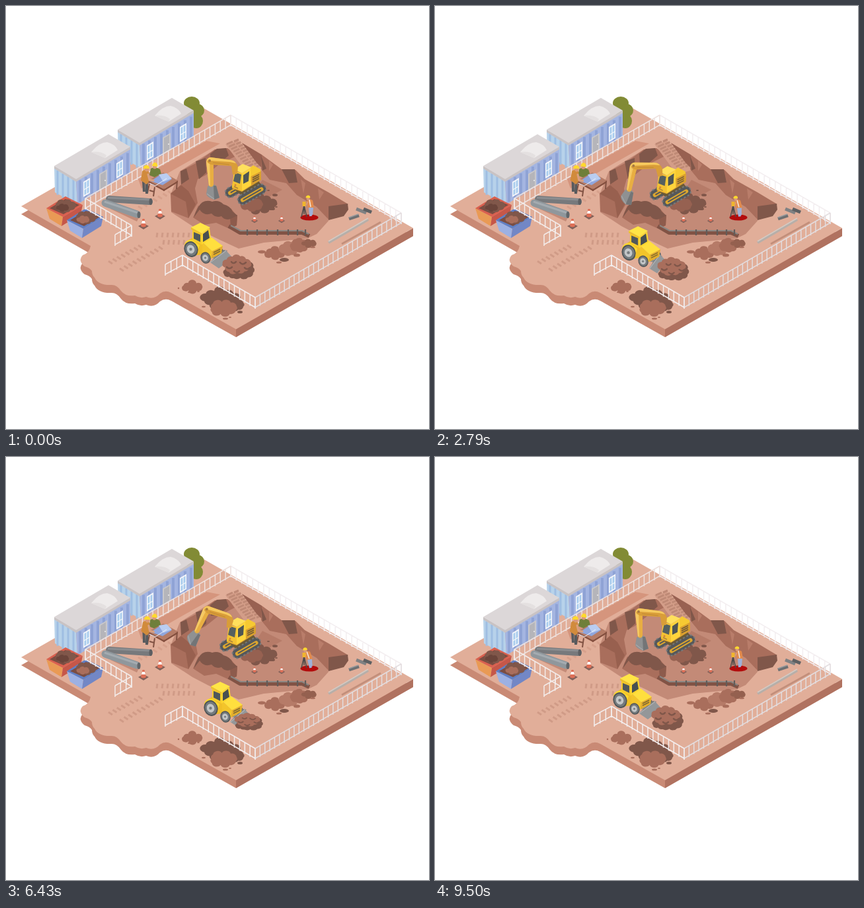
An HTML page that plays this animation: 640 px wide and 640 px high, repeating every 9.57 s.

```html
<!DOCTYPE html>
<html lang="en">
<head>
<meta charset="utf-8">
<title>Building site</title>
<style>
html, body { margin: 0; width: 100%; height: 100%; overflow: hidden; background: #fff; }
svg { display: block; width: 100vw; height: 100vh; }
</style>
</head>
<body>
<svg id="stage" viewBox="0 0 640 640"></svg>
<script>
const LOOP = 9570;
const SOIL = '#a96e5c', DARK = '#80574a', YEL = '#ffd92e', AMBER = '#e8ae42', GREY = '#8c8e90', COAL = '#55585b';

// Drawing helpers, each returns SVG markup
const poly = (fill, pts) => `<polygon fill="${fill}" points="${pts}"/>`;
const path = (fill, d) => `<path fill="${fill}" d="${d}"/>`;
const line = (c, w, d, cap = 'butt') => `<path d="${d}" fill="none" stroke="${c}" stroke-width="${w}" stroke-linecap="${cap}" stroke-linejoin="round"/>`;
const oval = (fill, x, y, rx, ry = rx, rot = 0) =>
  `<ellipse fill="${fill}" cx="${x}" cy="${y}" rx="${rx}" ry="${ry}" transform="rotate(${rot} ${x} ${y})"/>`;
const group = (id, body) => `<g id="${id}">${body}</g>`;
const shift = (x, y, body) => `<g transform="translate(${x} ${y})">${body}</g>`;

// Lumpy outline made of arcs round an ellipse
function blob(fill, x, y, rx, ry, n = 9) {
  let d = '';
  for (let i = 0; i <= n; i++) {
    const a = i * 2 * Math.PI / n + 0.4, k = 0.88 + 0.07 * Math.sin(i % n * 2.7);
    const r = (rx + ry) * 1.9 / n;
    const at = `${(x + rx * k * Math.cos(a)).toFixed(1)} ${(y + ry * k * Math.sin(a)).toFixed(1)}`;
    d += i ? `A${r} ${r * 0.8} 0 0 1 ${at}` : 'M' + at;
  }
  return path(fill, d + 'Z');
}

function fence(x1, y1, x2, y2, n, c, h = 17) {
  let d = `M${x1} ${y1}L${x2} ${y2}M${x1} ${y1 + h - 2}L${x2} ${y2 + h - 2}`;
  for (let i = 0; i <= n; i++) {
    const x = x1 + (x2 - x1) * i / n, y = y1 + (y2 - y1) * i / n;
    d += `M${x} ${y}V${y + h}`;
  }
  return line(c, 1.5, d);
}

// Row of short tyre marks
function marks(x1, y1, x2, y2, n, dx, dy, c = '#d09b87') {
  let d = '';
  for (let i = 0; i < n; i++) {
    const k = i / (n - 1);
    d += `M${x1 + (x2 - x1) * k} ${y1 + (y2 - y1) * k}l${dx} ${dy}`;
  }
  return line(c, 3, d);
}

function ground() {
  const edge = 'M23 303L291 150L616 336L348 489L250 434Q241 429 233 435Q224 445 212 440Q203 443 195 438' +
    'Q181 440 174 431Q168 422 160 422Q140 423 134 411Q130 407 130 401Q127 396 119 394Q108 385 116 377Q126 374 128 363Z';
  return shift(0, 12, path('#c98a75', edge)) +
    poly('#b07260', '616,336 616,348 348,501 348,489') +
    path('#e1ae99', edge) +
    marks(155, 386, 200, 362, 8, 6, 4) + marks(172, 397, 231, 364, 10, 6, 4) +
    marks(229, 343, 277, 343, 7, -1, 7) + marks(239, 354, 285, 354, 7, -1, 7) +
    marks(200, 303, 245, 280, 7, 6, 4, '#d7a18c') +
    poly('#d5957d', '200,262 303,204 324,208 262,243 205,276');
}

function pit() {
  let posts = '';
  for (const x of [365, 380, 395, 411, 427, 441, 453]) posts += `M${x} 338v9`;
  return poly('#c38a77', '263,250 316,217 356,228 387,240 440,270 488,305 488,325 470,345 455,352 390,358 352,367 326,355 305,345 282,333 250,312 250,283') +
    poly(SOIL, '264,250 287,238 316,217 335,215 350,226 322,240 302,256 290,262 286,276 290,298 276,321 250,311 249,284 265,270') +
    poly(DARK, '264,250 273,246 277,262 265,270') +
    poly(DARK, '287,235 302,230 303,252 292,262') +
    poly(DARK, '309,224 319,216 333,215 337,226 321,240 310,240') +
    poly('#98604f', '249,284 265,271 276,280 287,300 276,321 272,296') +
    poly('#d39d88', '332,209 351,204 392,247 366,255') +
    marks(334, 209, 368, 247, 11, 9, -4, '#bf8a76') + marks(345, 205, 379, 243, 11, 7, -3, '#bf8a76') +
    poly('#986151', '357,207 387,225 389,247 379,237') +
    poly(SOIL, '387,225 417,247 438,248 452,262 488,282 518,300 488,306 488,323 470,304 440,286 424,268 399,263 386,247') +
    poly('#b97d6a', '398,234 404,240 398,250') + poly('#b97d6a', '446,262 453,268 450,284') + poly('#b97d6a', '472,276 481,282 474,293') +
    poly(DARK, '417,247 437,247 441,267 428,268') +
    poly(DARK, '386,227 394,246 388,249') +
    poly(DARK, '488,303 517,299 518,308 511,318 488,324') +
    poly('#b67b68', '388,263 418,278 396,290 378,278') +
    blob(DARK, 384, 299, 28, 13, 11) + blob('#966151', 372, 300, 19, 10, 8) +
    oval(DARK, 407, 286, 4, 2) + oval(DARK, 403, 307, 4, 2) + oval(DARK, 397, 279, 2, 1) + oval(DARK, 409, 304, 2, 1) +
    path(SOIL, 'M283 320L291 302L340 306L350 318L349 332L338 337L318 328L300 331Z') +
    poly('#8d5b4c', '339,320 350,316 349,332 340,336') +
    path(DARK, 'M284 320Q290 302 297 297Q304 293 312 296Q322 293 329 300Q340 303 343 311L350 317L340 322Q331 325 326 318Q317 321 311 314Q299 318 293 308Z') +
    line('#815345', 6, 'M337 333L354 343H448L459 348') +
    line('#8b8682', 2, 'M340 332L355 340H448L458 345') + line('#625c59', 2.2, posts);
}

function spoil() {
  return blob(SOIL, 407, 374, 18, 8, 8) + blob('#b67b68', 428, 367, 16, 11, 7) + blob(SOIL, 444, 362, 15, 11, 8) + blob('#94604f', 459, 359, 13, 5, 7) +
    oval(SOIL, 387, 372, 6, 2.5) + oval(DARK, 421, 384, 7, 3) + oval(SOIL, 440, 377, 5, 2.5) + oval(SOIL, 413, 388, 4, 1.5) + oval(SOIL, 464, 365, 4, 1.3) +
    blob(SOIL, 282, 425, 18, 7, 8) + oval(SOIL, 278, 433, 3, 1.3) + oval(SOIL, 261, 427, 1.2) + oval(SOIL, 291, 432, 2, 1) +
    blob(DARK, 324, 442, 33, 13, 11) + blob(DARK, 346, 452, 16, 9, 8) + blob(SOIL, 329, 457, 23, 11, 9) +
    oval(DARK, 354, 463, 4, 2) + oval(SOIL, 299, 455, 3, 1.3) + oval(SOIL, 332, 473, 4, 1.5) + oval(SOIL, 339, 471, 2, 1);
}

function cabin() {
  let left = '', right = '';
  for (let x = 78; x < 106; x += 8) left += `M${x} ${246 + (x - 73) * 0.57}v37`;
  for (let x = 112; x < 188; x += 9) right += `M${x} ${267 - (x - 106) * 0.57}v33`;
  const pane = (x, y) => poly('#f4f6fa', `${x},${y} ${x + 10},${y - 6} ${x + 10},${y + 17} ${x},${y + 23}`) +
    poly('#a9cdee', `${x + 1.5},${y + 1.2} ${x + 8.5},${y - 3} ${x + 8.5},${y + 16} ${x + 1.5},${y + 20}`) +
    line('#f4f6fa', 1.2, `M${x + 5} ${y - 2}v22M${x + 1} ${y + 12}l8 -5`);
  return poly('#b7d2ea', '73,245 106,264 108,300 74,282') + line('#9fbee2', 3, left) +
    poly('#a4b5e1', '106,264 188,216 188,252 108,300') + line('#8fa3d5', 4, right) +
    pane(117, 266) + pane(167, 238) +
    poly('#c9c8cb', '141,254 153,247 153,273 141,280') + poly('#b5b5ba', '143,255 151,250 151,272 143,277') +
    oval('#eee', 150, 264, 1) +
    poly('#c9c3c4', '73,242 106,261 188,213 188,217 106,266 73,246') +
    poly('#dcd7d8', '73,242 155,194 188,213 106,262') +
    path('#eeebeb', 'M129 221Q141 206 153 206Q165 209 169 218L150 230Z') +
    path('#e4e0e0', 'M129 221L150 230L152 226Q143 219 129 221Z');
}

function skip(x, y, rim, light, dark) {
  return shift(x, y, poly(light, '0,18 25,31 23,45 5,34') + poly(dark, '25,31 55,13 52,27 23,45') +
    poly(rim, '0,18 29,0 55,13 25,31') + poly('#7b4d42', '5,18 29,4 50,13 26,27') +
    blob(DARK, 29, 14, 18, 8, 9) + blob(x > 80 ? SOIL : '#6b453b', 25, 17, 11, 5, 7));
}

function cone(x, y, s) {
  return `<g transform="translate(${x} ${y}) scale(${s})">` + poly('#80615a', '-8,3 0,-1 8,3 0,8') +
    path('#de6f57', 'M-4 3L-1.5 -8H1.5L4 3Q0 6 -4 3Z') + poly('#fff', '-3,-1 -2,-5 2,-5 3,-1') + '</g>';
}

function yard() {
  return line('#c48b78', 9, 'M160 303L200 322') +
    line('#77797c', 10, 'M156 292L217 296', 'round') + line('#8b8d90', 3, 'M154 290L219 293') + oval('#5c5e61', 219, 296, 2.5, 5) +
    line('#8f979c', 11, 'M150 298L198 315', 'round') + line('#a4abb0', 3, 'M149 296L200 313') + oval('#626669', 201, 316, 2.5, 5) +
    skip(61, 288, '#d9604f', '#e99a55', '#c65749') + skip(92, 306, '#5f7fc5', '#9db1e3', '#7287c6') +
    cone(208, 330, 1) + cone(233, 315, 1) + cone(376, 323, 0.65) + cone(417, 323, 0.65) +
    line('#b7afa9', 4, 'M488 358L548 323') + line('#d3cbc5', 1.5, 'M488 356L548 321') + line('#c38f7b', 3, 'M508 360L567 327') +
    line('#6e7072', 5, 'M519 322L534 317') + line('#7f8183', 5, 'M530 307L545 313') + line('#5e6062', 5, 'M541 307L553 312') + line('#9a9c9e', 1.5, 'M519 320L533 315');
}

function crew() {
  return group('mate', path('#6f7f3a', 'M217 256L219 246Q225 242 233 247L235 254L227 260Z') + oval('#d99a78', 225, 243, 3, 3.5) + path(YEL, 'M221 242Q222 236 227 237Q230 239 229 243Z')) +
    line('#805142', 2, 'M217 269L214 283M225 274L223 288M259 264L258 277M239 275V280M217 279L224 281') +
    poly('#85503f', '215,267 239,280 260,267 260,264 239,277 215,264') +
    poly('#b57c67', '215,264 238,252 260,264 239,277') +
    poly('#8fa6dd', '219,265 234,255 251,262 237,271') + poly('#b9cdf1', '231,255 243,253 251,261 238,266') + line('#eef2fc', 1, 'M217 268L226 272L243 261') +
    group('lead', line('#575a5d', 4, 'M208 265L209 281M213 267L213 284') +
      path('#d18b3c', 'M204 264L206 250Q210 246 216 250L218 263L213 270Z') +
      line('#d9a080', 3, 'M215 255L217 263L223 264', 'round') + oval('#d99a78', 213, 247, 3, 3.5) + path(YEL, 'M208 246Q208 240 214 241Q217 242 217 246Z'));
}

function surveyor() {
  return oval('#b30c0c', 459, 320, 13.5, 4.5) +
    group('surveyor', line('#9fb0d8', 4, 'M460 304L461 318M463 304L462 316') +
      path('#e28a4c', 'M455 296Q459 290 464 294L466 305H457Z') + line('#f5e9dc', 1.5, 'M459 293L461 304') +
      line('#d99a78', 2, 'M457 296L454 301') + oval('#d99a78', 457, 291, 2.5, 3) + path(YEL, 'M453.500 290Q454 286 458 286.500Q461 287.500 460 290.500Z')) +
    line('#4d4a49', 1.5, 'M451 302L447 319M451 302L455 319M451 302V315') + line('#f0b52e', 5, 'M451 296V303');
}

// Digger, drawn at rest; the boom's local zero is its foot
function digger() {
  const track = (x, y, l) => `<g transform="translate(${x} ${y}) rotate(-30)">` +
    `<rect x="${-l / 2}" y="-7.500" width="${l}" height="15" rx="7.500" fill="${COAL}"/>` +
    `<rect x="${-l / 2}" y="-7.500" width="${l}" height="15" rx="7.500" fill="none" stroke="#777a7c" stroke-width="2" stroke-dasharray="3 3"/>` +
    `<rect x="${4 - l / 2}" y="-2.500" width="${l - 8}" height="6" rx="3" fill="#dca62e"/>` +
    line('#55585b', 2, `M${8 - l / 2} .5H${l / 2 - 8}`) + '</g>';
  const base = track(350, 276, 40) + poly('#6b5a36', '346,278 380,262 386,270 358,288') + track(372, 285, 47) +
    poly('#e2a72f', '342,269 370,264 386,253 386,263 357,281 342,276') +
    poly('#f6c932', '366,247 374,241 385,247 386,254 370,263') + poly('#d99f2f', '370,258 386,250 386,263 370,272') +
    line('#705a36', 1.4, 'M373 260l10 -5M373 263l10 -5M373 266l10 -5') +
    poly('#f3c233', '342,274 345,249 358,253 357,280') + poly('#ffd53c', '357,253 370,245 371,271 357,280') +
    poly('#55605f', '344,265 347,252 356,255 354,269') + poly('#4f5654', '359,256 368,250 367,265 359,269') +
    poly('#ffe05d', '345,247 358,239 371,244 357,253') + line('#ae833a', 1.5, 'M345 273l6 3') + oval('#d2803c', 347, 271, 1.5);
  const bucket = path('#8f9192', 'M-5 1Q2 -5 8 0L13 18L5 21Q-6 18 -7 12Z') + path('#737577', 'M4 0L8 0L13 18L5 21Z') + line('#a8a9aa', 1.2, 'M-6 12Q0 17 5 20');
  const stick = line('#666158', 2, 'M5 7L4 30') + path(AMBER, 'M-5 2Q-5 -5 3 -4Q7 0 6 6L6 37Q3 42 -1 38Z') + path('#f5c965', 'M-5 2Q-4 -4 0 -4L1 38L-1 37Z');
  const boom = path('#d99d38', 'M-42 -11Q-44 -19 -37 -19L-7 -15Q1 -14 4 -5L3 6L-4 7L-6 -6L-37 -8Z') +
    path('#f6c95e', 'M-43 -14Q-42 -19 -37 -19L-7 -15Q-1 -14 1 -10L-8 -12L-38 -14Z') + line('#c28937', 1, 'M-34 -11L-9 -8') + oval('#a77a3f', -39, -14, 2);
  return group('digger', base + group('boom', `<g transform="translate(-39 -14)">` + group('stick', group('bucket', bucket) + stick) + '</g>' + boom));
}

function loader() {
  const wheel = (x, y, r) => oval('#4d5356', x, y, r * 0.95, r * 1.1, -20) + oval('#747a7d', x, y, r * 0.8, r * 0.92, -20) +
    oval('#c3c6c7', x - 0.5, y, r * 0.52, r * 0.6, -20) + oval('#777c7f', x - 0.5, y, r * 0.2);
  const scoop = poly('#777a7c', '309,387 329,369 335,370 319,391') + poly('#949799', '309,388 333,370 343,381 322,397') + line('#b0b2b3', 1.5, 'M309 388L333 370');
  return group('loader',
    oval('#5a5f61', 324, 372, 5, 6) + line('#8a8d8f', 4, 'M306 377L322 382M319 371L330 375') + group('scoop', scoop) +
    poly('#f0bf28', '271,358 283,350 297,359 298,376 288,377') +
    poly('#ffdf3e', '297,357 311,350 328,363 312,371') + poly('#f3c52a', '297,357 312,371 311,382 297,374') + poly('#e3ae2b', '312,371 328,363 326,374 311,382') +
    line('#7f6832', 1.4, 'M314 373l10 -5M314 376l10 -5') +
    poly('#f7cb2a', '282,338 296,344 296,361 282,354') + poly('#ffd62f', '296,344 308,336 310,352 296,361') +
    poly('#50585a', '284,342 294,346 294,357 284,352') + poly('#485052', '298,345 306,339 308,351 298,357') +
    poly('#ffe546', '280,335 294,328 309,335 296,344') + poly('#edc22a', '280,335 296,344 296,346 280,338') +
    path('#ffd92e', 'M270 361Q273 352 282 354L293 362L291 367Q282 356 270 364Z') +
    wheel(280, 368, 11) + wheel(302, 381, 8));
}

const heap = () => group('heap', blob(DARK, 4, 3, 22, 16, 10) + blob(DARK, -10, 7, 14, 10, 8) + blob(SOIL, -3, -4, 23, 14, 11) +
  line(DARK, 2.5, 'M-18 0q4 4 8 0M-7 6q4 4 8 0M2 -7q4 5 9 0M9 1q4 4 8 0M-11 -8q3 4 7 0', 'round'));

const stage = document.getElementById('stage');
stage.innerHTML = ground() +
  oval('#717c2e', 283, 160, 9, 18) + oval('#828b35', 281, 147, 12, 10) + oval('#828b35', 290, 158, 10) + oval('#828b35', 288, 174, 10, 11) +
  pit() + fence(340, 165, 598, 313, 31, '#f3eef0') +
  shift(96, -55, cabin()) + cabin() +
  fence(120, 291, 340, 165, 28, '#eee2df') + yard() + fence(120, 291, 190, 332, 9, '#f3ebe9') + fence(190, 332, 165, 346, 3, '#f3ebe9') +
  crew() + spoil() + digger() + surveyor() + loader() + heap() +
  fence(598, 313, 377, 441, 30, '#e3dddf') + fence(267, 377, 377, 441, 14, '#f4eeee') + fence(267, 377, 241, 391, 3, '#f4eeee');

// Motion tables: [seconds, value]
const KEYS = {
  drive: [[0.21, 0], [2.07, 0.5], [3.3, 1], [6.7, 1], [8.1, 0.03], [8.6, 0]],
  boom: [[0.21, 0], [1.1, 20], [1.5, 24], [2.07, 22], [3.2, -23], [3.57, -36], [4.1, -41], [4.86, -41], [5.2, -33], [6.14, 5], [6.43, 12], [6.9, 17], [8.21, 2], [9.1, 0]],
  stick: [[0.21, 0], [1.1, 24], [2.07, 32], [3.2, 4], [3.57, -10], [4.2, -25], [4.86, -29], [5.5, -2], [6.43, 28], [7, 28], [8.21, 6], [9.1, 0]],
  bucket: [[0.21, 0], [2.07, 36], [3.57, 14], [4.86, -2], [6.43, 38], [8.21, 20], [9.5, 0]],
  roll: [[0.21, 0], [1.3, 0.5], [2.07, 3], [3.57, 24], [4.3, 30], [6.7, 30], [8.1, 1.5], [9.4, 0]],
  scoop: [[0.21, 0], [2.07, 1], [3.57, 1], [5.5, 0.6], [7, 0], [9.5, 0]],
  heapX: [[2.1, 352], [3.57, 370.5], [4.5, 367.5], [6.43, 367.5], [8.21, 363], [9.5, 352]],
  heapY: [[2.1, 395], [3.57, 401], [4.5, 400.5], [6.43, 400.5], [8.21, 398], [9.5, 395]],
  heapW: [[2.1, 53], [3.57, 51], [4.5, 47], [6.43, 47], [8.21, 50], [9.5, 53]],
  heapH: [[2.1, 38], [3.57, 34], [4.5, 27], [6.43, 27], [8.21, 30], [9.5, 38]],
  lean: [[2.2, 0], [3.4, 1], [8.3, 1], [9.4, 0]],
  nod: [[1.2, 0], [2.07, 1], [3.57, 0.4], [4.86, 1], [6.43, 0.6], [8.21, 1], [9.1, 0]]
};

function value(name, t) {
  const k = KEYS[name], i = k.findIndex(p => p[0] > t);
  if (i === 0) return k[0][1];
  if (i < 0) return k[k.length - 1][1];
  const [t0, a] = k[i - 1], [t1, b] = k[i];
  return a + (b - a) * (t - t0) / (t1 - t0);
}

const parts = {};
for (const g of stage.querySelectorAll('g[id]')) parts[g.id] = g;
const pose = (id, tf) => parts[id].setAttribute('transform', tf);

function draw(now) {
  const t = now % LOOP / 1000, v = name => value(name, t);
  const drive = v('drive'), boom = v('boom'), stick = v('stick'), roll = v('roll'), tip = v('scoop'), nod = v('nod'), lean = v('lean');
  pose('digger', `translate(${-8 * drive} ${4 * drive})`);
  pose('boom', `translate(347 248) rotate(${boom})`);
  pose('stick', `rotate(${stick - boom})`);
  pose('bucket', `translate(2 38) rotate(${v('bucket') - stick})`);
  pose('loader', `translate(${roll} ${roll * 0.4})`);
  pose('scoop', `translate(${-2 * tip} ${2 * tip}) rotate(${-10 * tip} 325 382) translate(325 382) scale(${1 - 0.2 * tip} 1) translate(-325 -382)`);
  pose('heap', `translate(${v('heapX')} ${v('heapY')}) scale(${v('heapW') / 53} ${v('heapH') / 38})`);
  pose('surveyor', `translate(0 ${lean}) rotate(${-9 * lean} 461 318)`);
  pose('lead', `rotate(${3 * nod} 210 282)`);
  pose('mate', `translate(${-nod} ${0.6 * nod})`);
}

const start = performance.now();
function tick() {
  draw(performance.now() - start);
  requestAnimationFrame(tick);
}
tick();
</script>
</body>
</html>
```
